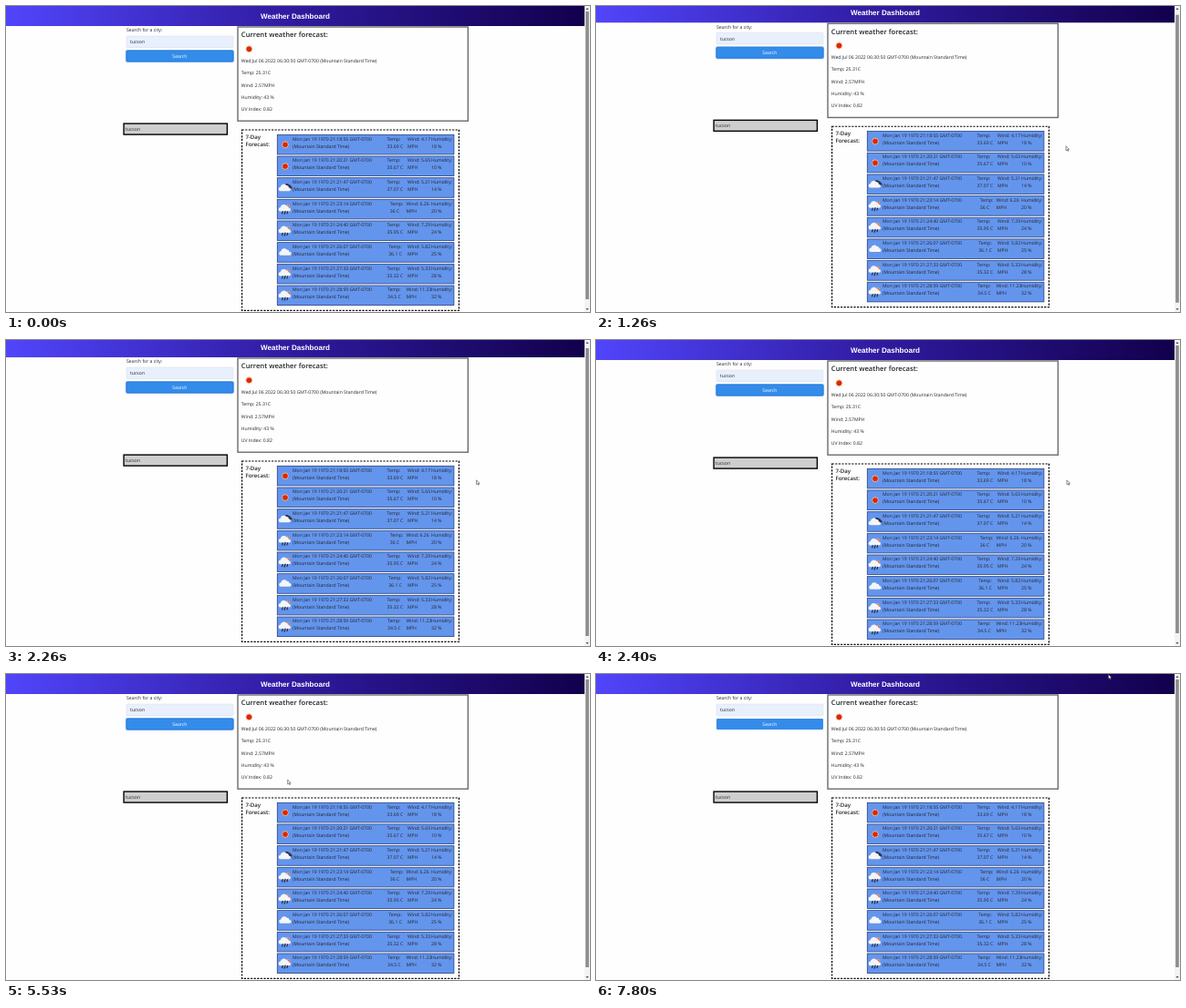
An HTML page for the animation above (8 s loop, 640 px wide and 336 px high).

```html
<!DOCTYPE html>
<html lang="en">
<head>
<meta charset="utf-8">
<title>Weather Dashboard</title>
<style>
  html, body { margin: 0; width: 100%; height: 100%; overflow: hidden; background: #fefefe; }
  svg { display: block; width: 100vw; height: 100vh; }
  text { font: 5.12px "Open Sans", "Noto Sans", sans-serif; fill: #212529; text-rendering: geometricPrecision; white-space: pre; }
  .title { font: bold 8.05px "Liberation Sans", Arial, sans-serif; fill: #fff; text-anchor: middle; }
  .heading { font-size: 7.65px; font-weight: 600; }
  .subheading { font-size: 6.1px; font-weight: 600; }
  .button { fill: #fff; text-anchor: middle; }
  .card { fill: #6495ed; stroke: #26417f; stroke-width: .8; }
</style>
</head>
<body>
<svg viewBox="0 0 640 336" preserveAspectRatio="none">
  <defs>
    <linearGradient id="banner">
      <stop offset="0" stop-color="#5145fb"/>
      <stop offset=".5" stop-color="#2f1a9e"/>
      <stop offset="1" stop-color="#12004c"/>
    </linearGradient>
    <g id="sun">
      <path d="M0-4.2L1.3-3 3-3 3-1.3 4.2 0 3 1.3 3 3 1.3 3 0 4.2-1.3 3-3 3-3 1.3-4.2 0-3-1.3-3-3-1.3-3Z" fill="#f6b27c"/>
      <circle r="2.8" fill="#d9260f"/>
    </g>
    <path id="cloud" d="M-4.4 3.2a2.3 2.3 0 0 1-.2-4.6a3.6 3.6 0 0 1 6.4-1.6a2.6 2.6 0 0 1 2.8 2.4a1.9 1.9 0 0 1 .2 3.8Z"/>
    <g id="clear"><use href="#sun"/></g>
    <g id="cloudy"><use href="#cloud" fill="#f4f5f7"/></g>
    <g id="broken">
      <use href="#cloud" transform="translate(2.6 -1.4) scale(.75)" fill="#30343c"/>
      <use href="#cloud" transform="translate(-.6 .4)" fill="#f4f5f7"/>
    </g>
    <g id="rain">
      <use href="#sun" transform="translate(2.4 -2.2) scale(.75)"/>
      <use href="#cloud" transform="translate(-.6 -1)" fill="#f4f5f7"/>
      <path d="M-2.6 2l-1 3M.2 1.6l-1.2 4M2.8 2l-1 3" stroke="#262b3d" stroke-width="1.2"/>
    </g>
  </defs>

  <g id="page">
    <rect width="634" height="22" fill="url(#banner)"/>
    <text class="title" x="317" y="13.8">Weather Dashboard</text>

    <text x="132" y="28.4">Search for a city:</text>
    <rect x="132" y="33" width="117" height="12.7" rx="1.3" fill="#e8f0fe" stroke="#ced4da" stroke-width=".4"/>
    <text x="136" y="41.4">tucson</text>
    <rect id="focus" x="131.6" y="48.6" width="117.8" height="12.8" rx="1.6" fill="none" stroke="#8fc0f7" stroke-width="1.4"/>
    <rect id="search" x="132" y="49" width="117" height="12" rx="1.3" fill="#348cea" stroke-width=".7"/>
    <text class="button" x="190.4" y="56.9">Search</text>
    <rect x="129.1" y="129.1" width="113.3" height="12" fill="#cecece" stroke="#000" stroke-width="1.4"/>
    <text x="131" y="136.9">tucson</text>

    <rect x="254" y="23" width="252.3" height="103.2" fill="none" stroke="#6c6c6c" stroke-width="1.4"/>
    <text class="heading" x="257.8" y="34.3">Current weather forecast:</text>
    <use href="#sun" x="266.4" y="47.2"/>
    <g id="current"></g>

    <rect x="258.6" y="136" width="237.8" height="198.4" fill="none" stroke="#000" stroke-width="1.2" stroke-dasharray="2.2 1.4"/>
    <text class="subheading" x="262.4" y="146">7-Day</text>
    <text class="subheading" x="262.4" y="153.9">Forecast:</text>
    <g id="days"></g>
  </g>

  <rect x="634" width="6" height="336" fill="#f3f3f3"/>
  <path d="M635.3 4l1.7-2 1.7 2ZM635.3 332l1.7 2 1.7-2Z" fill="#555"/>
  <rect id="thumb" x="635.2" y="6" width="3.6" height="316" fill="#8c8c8c"/>
  <path id="cursor" d="M0 0V4.9L1.2 3.9 2 5.6 2.8 5.2 2 3.6H3.4Z" fill="#fff" stroke="#222" stroke-width=".5"/>
</svg>
<script>
const byId = id => document.getElementById(id);
const label = (x, y, words) => `<text x="${x}" y="${y}">${words}</text>`;

byId('current').innerHTML = [
  'Wed Jul 06 2022 06:30:50 GMT-0700 (Mountain Standard Time)',
  'Temp: 25.31C', 'Wind: 2.57MPH', 'Humidity: 43 %', 'UV Index: 0.82'
].map((words, i) => label(257.8, 61.8 + i * 13.35, words)).join('');

// icon, time, temperature, wind, humidity, temperature x, wind x
const days = [
  ['clear', '18:55', '33.69', '4.17', 18, 417.6, 440],
  ['clear', '20:21', '35.67', '5.65', 10, 417.6, 440],
  ['broken', '21:47', '37.07', '5.21', 14, 417.6, 440],
  ['rain', '23:14', '36', '6.26', 20, 420.8, 438.6],
  ['rain', '24:40', '35.95', '7.29', 24, 417.6, 440],
  ['cloudy', '26:07', '36.1', '5.82', 25, 419.2, 440],
  ['rain', '27:33', '35.32', '5.33', 28, 417.6, 440],
  ['rain', '28:59', '34.5', '11.23', 32, 418, 438.4]
];
byId('days').innerHTML = days.map(([icon, time, temp, wind, humidity, tempX, windX], i) => {
  const top = 141.3 + i * 23.67, line1 = top + 6.2, line2 = top + 14.2;
  return `<rect class="card" x="297.3" y="${top}" width="193.6" height="21.6"/>
    <use href="#${icon}" x="306" y="${top + 11}"/>` +
    label(314, line1, `Mon Jan 19 1970 21:${time} GMT-0700`) +
    label(314, line2, '(Mountain Standard Time)') +
    label(tempX, line1, 'Temp:') + label(tempX, line2, `${temp} C`) +
    label(windX, line1, `Wind: ${wind}`) + label(windX, line2, 'MPH') +
    label(466, line1, 'Humidity:') + label(466, line2, `${humidity} %`);
}).join('');

const LOOP = 8000, BLUR_AT = 6130;
// Keys are [ms, value, ...]
const scrollKeys = [[0, 0], [1130, 0], [1260, 3.7], [1400, 7.9], [2040, 7.9], [2060, 7.3], [2400, 0], [LOOP, 0]];
const cursorKeys = [
  [0, 645, 130], [800, 645, 130], [1130, 515, 153.8], [2060, 515, 153.8], [2400, 516, 153.8],
  [3940, 516, 153.8], [4000, 516, 152.4], [4800, 310, 40], [5200, 310, 40], [5530, 308.4, 116],
  [5930, 420, 150], [6130, 420, 150], [6400, 420, 250], [6930, 420, 250], [7730, 561.6, .5], [LOOP, 561.6, .5]
];

function valuesAt(keys, t) {
  const next = keys.findIndex(key => key[0] > t);
  const from = keys[next - 1], to = keys[next];
  const part = (t - from[0]) / (to[0] - from[0]);
  return from.slice(1).map((value, i) => value + (to[i + 1] - value) * part);
}

function draw(now) {
  const t = now % LOOP;
  const [scroll] = valuesAt(scrollKeys, t);
  const [x, y] = valuesAt(cursorKeys, t);
  const focused = t < BLUR_AT;
  byId('page').setAttribute('transform', `translate(0 ${-scroll})`);
  byId('thumb').setAttribute('y', 6 + scroll);
  byId('cursor').setAttribute('transform', `translate(${x} ${y})`);
  byId('focus').setAttribute('visibility', focused ? 'visible' : 'hidden');
  byId('search').setAttribute('stroke', focused ? '#1d6fd0' : 'none');
}

const start = performance.now();
function tick() {
  draw(performance.now() - start);
  requestAnimationFrame(tick);
}
tick();
</script>
</body>
</html>
```
